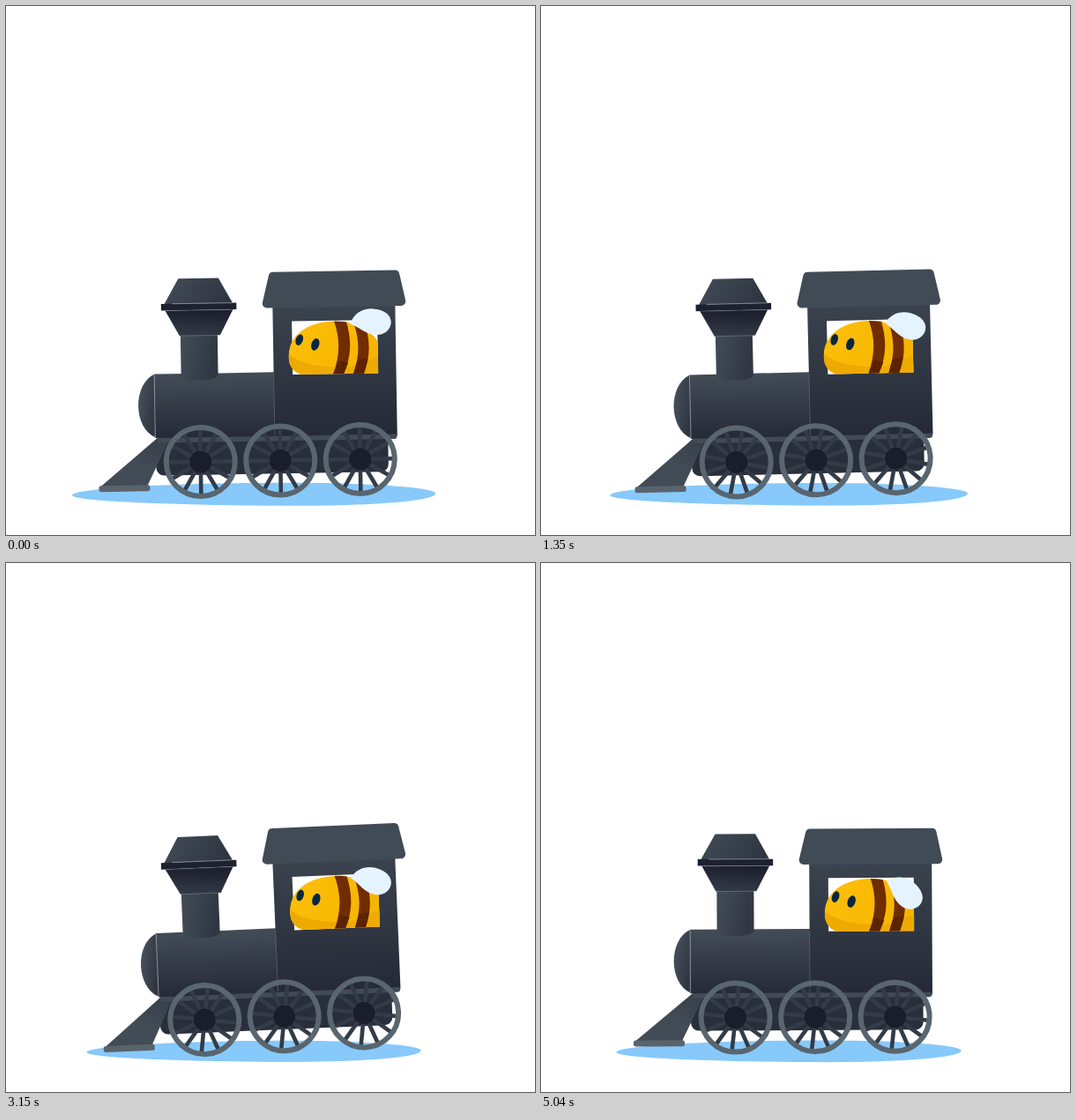
An HTML page for the animation above (5070 ms loop, 600x600 px).

```html
<!DOCTYPE html>
<html lang="en">
<head>
<meta charset="utf-8">
<title>Bee on a train</title>
<style>
  html, body { margin: 0; width: 100%; height: 100%; overflow: hidden; background: #fff; }
  svg { display: block; width: 100vw; height: 100vh; }
</style>
</head>
<body>
<svg viewBox="0 0 600 600" xmlns="http://www.w3.org/2000/svg">
  <defs>
    <linearGradient id="steel" x1="0" y1="0" x2="0" y2="1">
      <stop offset="0" stop-color="#424c57"/><stop offset="1" stop-color="#262a38"/>
    </linearGradient>
    <linearGradient id="cab" x1="0" y1="0" x2="0" y2="1">
      <stop offset="0" stop-color="#3a434e"/><stop offset=".5" stop-color="#303642"/><stop offset="1" stop-color="#252937"/>
    </linearGradient>
    <linearGradient id="side" x1="0" y1="0" x2="1" y2=".25">
      <stop offset="0" stop-color="#424c57"/><stop offset="1" stop-color="#303743"/>
    </linearGradient>
    <linearGradient id="nose" x1="0" y1="0" x2="1" y2=".6">
      <stop offset="0" stop-color="#4b5661"/><stop offset="1" stop-color="#2f3541"/>
    </linearGradient>
    <linearGradient id="funnel" x1=".6" y1="0" x2=".4" y2="1">
      <stop offset="0" stop-color="#1b1e2c"/><stop offset="1" stop-color="#333a46"/>
    </linearGradient>
    <linearGradient id="plow" x1="0" y1="1" x2="1" y2="0">
      <stop offset=".5" stop-color="#424c56"/><stop offset="1" stop-color="#353d48"/>
    </linearGradient>
    <linearGradient id="honey" x1="0" y1="0" x2="1" y2=".3">
      <stop offset="0" stop-color="#fdc00a"/><stop offset="1" stop-color="#f6b500"/>
    </linearGradient>
    <clipPath id="beeShape">
      <path id="beePath" d="M321 399C321 373 345 360 371 359.500C399 359 415 371 422.500 383V419.200H335C325 416 321 408 321 399Z"/>
    </clipPath>
    <g id="wheel">
      <g class="spokes" stroke="#333b47" stroke-width="4.600"></g>
      <circle r="39" fill="none" stroke="#59656f" stroke-width="6"/>
      <circle r="12.500" fill="#1a1d2b"/>
    </g>
  </defs>

  <path id="shadow" fill="#87c9fa" d="M-206.500 1C-205 -7 -90 -13.200 42 -13.200C130 -13.200 205.500 -8 206 -1C205 7 140 12.800 48 12.800C-85 12.500 -205 8 -206.500 1Z"/>

  <g id="train">
    <rect x="168" y="486" width="263.500" height="44" rx="9" fill="#292e3b"/>
    <path d="M170.500 487L184 488L157.500 542H104Z" fill="url(#plow)"/>
    <rect x="102.700" y="540.500" width="58" height="7" rx="2.500" fill="#59636c"/>

    <path d="M168 415C142.500 426 142.500 476 168 487Z" fill="url(#nose)"/>
    <rect x="167.500" y="415" width="136" height="72.500" fill="url(#steel)"/>
    <path d="M198 371H240V418Q236 422.500 219 422.500T198 418Z" fill="url(#side)"/>
    <path d="M181 343H258L243 372H197Z" fill="url(#funnel)"/>
    <path d="M196.500 307H242L258 336H180Z" fill="url(#side)"/>
    <rect x="176.500" y="335.500" width="85.500" height="7.500" fill="#1d2130"/>
    <g stroke="#fff" stroke-width=".7">
      <path d="M189 335.500H258M167.500 416V487" stroke-opacity=".6"/>
      <path d="M182 343.200H257M198 372H242" stroke-opacity=".3"/>
    </g>

    <path fill="url(#cab)" fill-rule="evenodd" d="M303 340H442V488Q442 492 438 492H303ZM324.500 357.500V418H421.500V357.500Z"/>
    <path d="M303 417V487" stroke="#79828a" stroke-opacity=".6" stroke-width=".7"/>
    <path d="M170 487.500H441.500V490Q441.500 493 438 493H170Z" fill="#414a55"/>

    <g transform="translate(-.8 -1.200)">
      <g clip-path="url(#beeShape)">
        <use href="#beePath" fill="url(#honey)"/>
        <path d="M320 395C338 410 362 412 390 412L423 400V420H320Z" fill="#eeaa00"/>
        <path d="M372 356C380 378 380 397 371 420H383C393 398 393 380 386 356ZM395 360C402 382 402 398 394 420H406C414 400 414 384 408 360Z" fill="#702d00"/>
        <path d="M377 404C376 410 374 414 371 420H383L388.500 407ZM399 404L394 420H406L411 402Z" fill="#5c2300"/>
      </g>
      <g fill="#08263f">
        <ellipse rx="4" ry="6.500" transform="translate(333.500 380) rotate(20)"/>
        <ellipse rx="4.400" ry="7" transform="translate(351.500 385.500) rotate(20)"/>
      </g>
    </g>
    <path id="wing" fill="#e5f3fe" d="M0 0C5 -13 15 -18 26 -17.500C38 -17 47 -11 46.500 -2C46 7 38 13 28 12C17 11 10 3 0 0Z"/>

    <path d="M304 306.500H442.500L449 337H296.500Z" fill="#414b56" stroke="#414b56" stroke-width="10" stroke-linejoin="round"/>

    <use href="#wheel" x="218.500" y="515.200"/>
    <use href="#wheel" x="309" y="515.200"/>
    <use href="#wheel" x="399.500" y="515.200"/>
  </g>
</svg>
<script>
  const LOOP = 5070, STEP = 30, SPOKES = 12;
  const SPIN = -.3023; // degrees per ms
  const PIVOT = [295, 398];

  // time, x shift, y shift, tilt in degrees
  const sway = [
    [0, .3, .5, -.95], [480, .8, 1, .2], [930, 1, 1.7, .6], [1400, .4, .4, -1.4],
    [1770, 0, -.1, .15], [2040, .5, 0, -1.2], [2300, 1, .5, .2], [2580, 1.3, .5, -.95],
    [3150, 1.8, -.3, -2.4], [3700, 1.9, -.2, .1], [4200, 1.8, -.5, 1.27],
    [4620, 1.6, -.2, .5], [5040, 1.5, 0, -.3]
  ];

  const $ = s => document.querySelector(s);
  const spokes = $('.spokes'), train = $('#train'), wing = $('#wing'), shadow = $('#shadow');
  const set = (el, value) => el.setAttribute('transform', value);
  const smooth = u => u * u * (3 - 2 * u);
  const wave = (t, period) => Math.cos(2 * Math.PI * t / period);

  for (let i = 0; i < SPOKES; i++) {
    const line = document.createElementNS('http://www.w3.org/2000/svg', 'line');
    line.setAttribute('y1', 10);
    line.setAttribute('y2', 38);
    set(line, `rotate(${i * 360 / SPOKES})`);
    spokes.append(line);
  }

  function sample(keys, t) {
    let i = 0;
    while (i < keys.length - 2 && t >= keys[i + 1][0]) i++;
    const a = keys[i], b = keys[i + 1];
    const u = smooth(Math.min(1, (t - a[0]) / (b[0] - a[0])));
    return a.slice(1).map((v, k) => v + (b[k + 1] - v) * u);
  }

  function draw(t) {
    const [x, y, tilt] = sample(sway, t);
    set(train, `translate(${x} ${y}) rotate(${tilt} ${PIVOT})`);
    set(spokes, `rotate(${SPIN * t})`);
    set(wing, `translate(390.5 361.5) rotate(${20 - 18 * wave(t, 97.8)})`);
    const size = (195.5 + 10.5 * wave(t - 15, 1182)) / 206;
    set(shadow, `translate(281.3 554) scale(${size})`);
  }

  const start = performance.now();
  function tick() {
    const t = (performance.now() - start) % LOOP;
    draw(Math.floor(t / STEP) * STEP);
    requestAnimationFrame(tick);
  }
  draw(0);
  requestAnimationFrame(tick);
</script>
</body>
</html>
```
